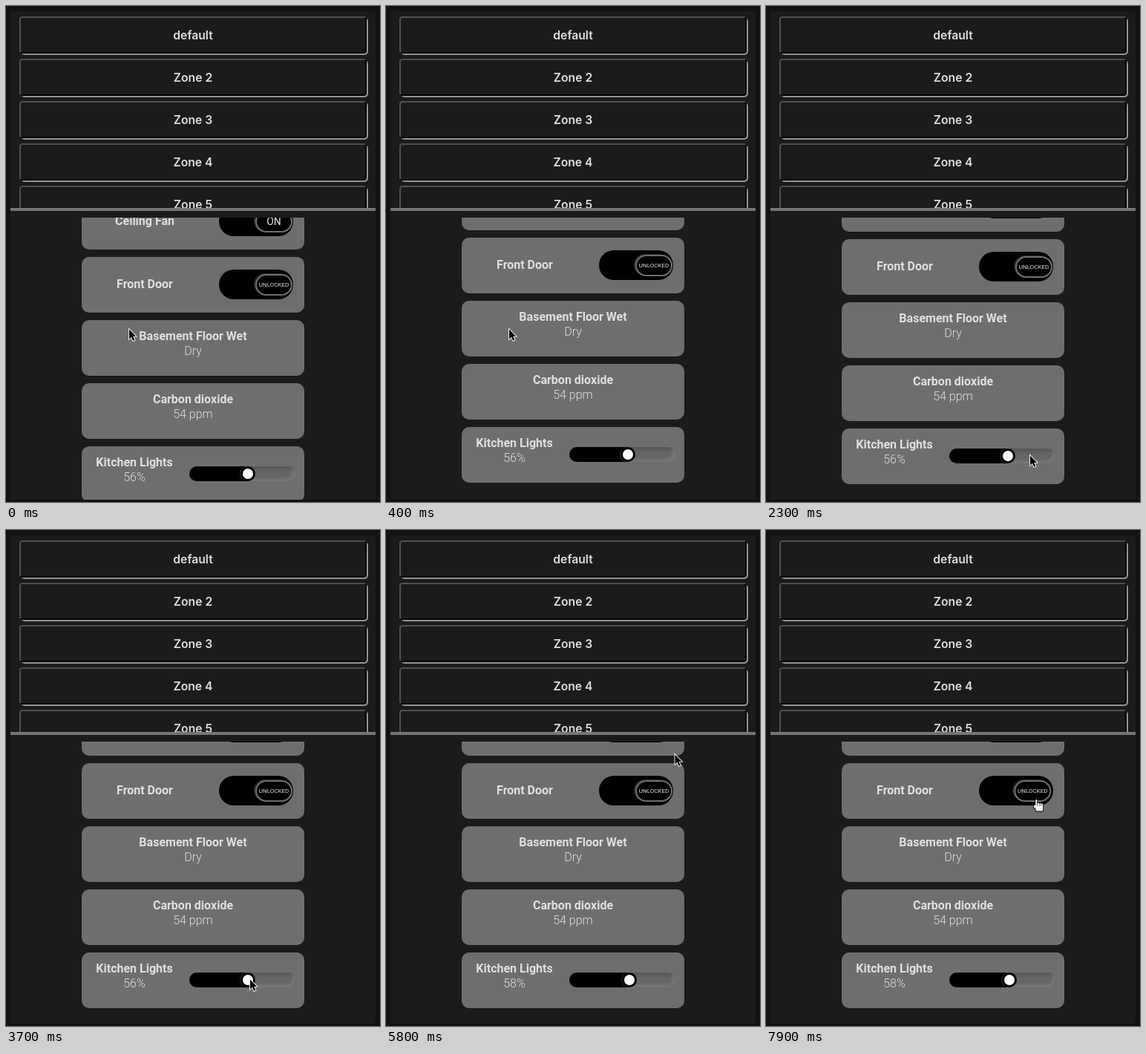
Animation of 504 by 668 pixels, one loop 8000 ms. Source, as an HTML page with a canvas:

```html
<!DOCTYPE html>
<html lang="en">
<head>
<meta charset="utf-8">
<title>Zone controls</title>
<style>
  html, body { margin: 0; width: 100%; height: 100%; overflow: hidden; background: #121212; }
  canvas { display: block; width: 504px; height: 668px; }
</style>
</head>
<body>
<canvas id="stage"></canvas>
<script>
const W = 504, H = 668, LOOP = 8000, STEP = 100;
const canvas = document.getElementById('stage');
const dpr = window.devicePixelRatio || 1;
canvas.width = W * dpr;
canvas.height = H * dpr;
const ctx = canvas.getContext('2d');

const PANEL = '#1b1b1b', CARD = '#6e6e6e', INK = '#e0e0e0', RIM = '#2c2c2c';
const PITCH = 85, KNOB_LEFT = 292.5, KNOB_RIGHT = 336;
const LOCK_AT = 6900, UNLOCK_AT = 7600, DRAG_AT = 4100;

const clamp = (v, lo, hi) => Math.min(hi, Math.max(lo, v));
const smooth = p => { p = clamp(p, 0, 1); return p * p * (3 - 2 * p); };

// The CSS "ease" curve: cubic-bezier(.25, .1, .25, 1).
function ease(p) {
  p = clamp(p, 0, 1);
  const bez = (u, a, b) => 3 * u * (1 - u) * (1 - u) * a + 3 * u * u * (1 - u) * b + u * u * u;
  let lo = 0, hi = 1;
  for (let i = 0; i < 20; i++) {
    const mid = (lo + hi) / 2;
    if (bez(mid, 0.25, 0.25) < p) lo = mid; else hi = mid;
  }
  return bez(lo, 0.1, 1);
}

// The list springs past its end and settles there.
const scrollAt = t => -24 * (1 - Math.exp(-t * 0.006) * Math.cos(t * 0.0078));

function pointerAt(t) {
  let x = 165, y = 434;
  const go = (from, to, toX, toY, bow = 0) => {
    const u = smooth((t - from) / (to - from));
    x += (toX - x) * u;
    y += (toY - y) * u + bow * Math.sin(Math.PI * u);
  };
  go(400, 900, 311, 650);
  go(900, 1400, 327, 605);
  go(2000, 2300, 355, 604);
  go(3000, 3700, 328, 604, 17);
  go(DRAG_AT, 5000, 367, 603);
  go(5300, 5800, 388.5, 301);
  go(5800, 6100, 313, 348);
  go(6400, 6800, 378, 350);
  go(7000, 7300, 360, 355);
  go(7400, 7500, 360, 362);
  return [x, y];
}

function box(x, y, w, h, r, fill, stroke, line) {
  ctx.beginPath();
  ctx.roundRect(x, y, w, h, r);
  if (fill) { ctx.fillStyle = fill; ctx.fill(); }
  if (stroke) { ctx.strokeStyle = stroke; ctx.lineWidth = line; ctx.stroke(); }
}

const disc = (x, y, r, fill) => box(x - r, y - r, r * 2, r * 2, r, fill);

function label(text, x, y, font) {
  ctx.font = font;
  ctx.fillStyle = INK;
  ctx.textAlign = 'center';
  ctx.fillText(text, x, y);
}

const bold = (text, x, y) => label(text, x, y, '700 16px Roboto, sans-serif');
const light = (text, x, y) => label(text, x, y, '300 16px Roboto, sans-serif');

function clipped(x, y, w, h, r, draw) {
  ctx.save();
  ctx.beginPath();
  ctx.roundRect(x, y, w, h, r);
  ctx.clip();
  draw();
  ctx.restore();
}

function polygon(points) {
  ctx.beginPath();
  points.forEach(p => ctx.lineTo(...p));
  ctx.closePath();
}

function zoneButton(text, y) {
  box(20, y + 2, 468, 50, 5, '#949494');
  box(18, y, 468, 50, 4, '#000');
  ctx.save();
  polygon([[18, y], [486, y], [484, y + 2], [20, y + 48], [18, y + 50]]);
  ctx.clip();
  box(18, y, 468, 50, 4, '#505050');
  ctx.restore();
  box(20, y + 2, 464, 46, 2, PANEL);
  label(text, 252, y + 31, '600 15.7px Inter, sans-serif');
}

const card = y => box(102, y, 300, 75, 10, CARD);

function toggle(name, y, x, text, size) {
  card(y);
  bold(name, 187, y + 42);
  box(287, y + 17, 100, 40, 20, '#000');
  box(x - 2, y + 22, 48, 29, 14.5, RIM);
  box(x + 1, y + 24, 48, 27, 13.5, '#000', '#6f6f6f', 2);
  label(text, x + 25, y + Math.round(37 + size * 0.36), `400 ${size}px Roboto, sans-serif`);
}

function sensor(name, value, y) {
  card(y);
  bold(name, 252, y + 27);
  light(value, 252, y + 47);
}

function slider(name, percent, y) {
  const knob = 270 + percent, top = y + 27;
  card(y);
  bold(name, 173, y + 27);
  light(percent + '%', 173, y + 47);
  clipped(247, top, 143, 20, 10, () => {
    box(247, top, 143, 20, 0, '#666');
    ctx.filter = 'blur(2px)';
    box(248, top + 1, 150, 30, 10, null, '#545454', 5);
    box(238, top - 11, 151, 30, 10, null, '#7e7e7e', 4);
    ctx.filter = 'none';
    box(247, top, knob - 247, 20, 0, '#000');
  });
  disc(knob - 1, y + 37, 10, RIM);
  disc(knob, y + 37, 10, '#000');
  disc(knob, y + 37, 7, '#fff');
}

function arrow() {
  polygon([[1, 1.5], [1, 14.5], [4, 11.7], [6.2, 16.8], [8.4, 15.9], [6.2, 10.9], [10, 10.7]]);
  ctx.lineWidth = 1.8;
  ctx.strokeStyle = '#fff';
  ctx.fillStyle = '#000';
  ctx.stroke();
  ctx.fill();
}

// Black silhouette first, then the same parts in white, inset to leave outlines.
function hand() {
  for (const [color, grow] of [['#000', 0.9], ['#fff', 0]]) {
    const part = (x, y, w, h, r) =>
      box(x - grow, y - grow, w + grow * 2, h + grow * 2, r + grow, color);
    for (let i = 0; i < 4; i++) part(3.3 + i * 2.6, i ? 5 + i * 0.5 : 1, 2, 10, 1);
    part(3.3, 10, 9.8, 6.5, 2.5);
    part(1, 8.5, 2.6, 4, 1.3);
  }
}

function draw(t) {
  ctx.setTransform(dpr, 0, 0, dpr, 0, 0);
  ctx.fillStyle = '#121212';
  ctx.fillRect(0, 0, W, H);
  box(6, 7, 492, 658, 4, PANEL);

  clipped(6, 7, 492, 265, 0, () => {
    for (let i = 0; i < 5; i++) zoneButton(i ? `Zone ${i + 1}` : 'default', 14 + i * 57);
  });
  box(6, 272, 492, 4, 0, '#757575');

  const top = 253 + Math.round(scrollAt(t));
  const lock = ease((t - LOCK_AT) / 400) - ease((t - UNLOCK_AT) / 400);
  const locked = t > LOCK_AT && t <= UNLOCK_AT;
  const doorX = KNOB_RIGHT + (KNOB_LEFT - KNOB_RIGHT) * lock;
  const percent = 56 + clamp(Math.floor((t - DRAG_AT) / 200), 0, 2);

  clipped(6, 285, 492, 380, 0, () => {
    toggle('Ceiling Fan', top, KNOB_RIGHT, 'ON', 14);
    toggle('Front Door', top + PITCH, doorX, locked ? 'LOCKED' : 'UNLOCKED', 8);
    sensor('Basement Floor Wet', 'Dry', top + PITCH * 2);
    sensor('Carbon dioxide', '54 ppm', top + PITCH * 3);
    slider('Kitchen Lights', percent, top + PITCH * 4);
  });

  ctx.save();
  ctx.translate(...pointerAt(t));
  if (t >= 6000) hand(); else arrow();
  ctx.restore();
}

const start = performance.now();
function tick() {
  const t = (performance.now() - start) % LOOP;
  draw(Math.floor(t / STEP) * STEP);
  requestAnimationFrame(tick);
}
tick();
</script>
</body>
</html>
```
